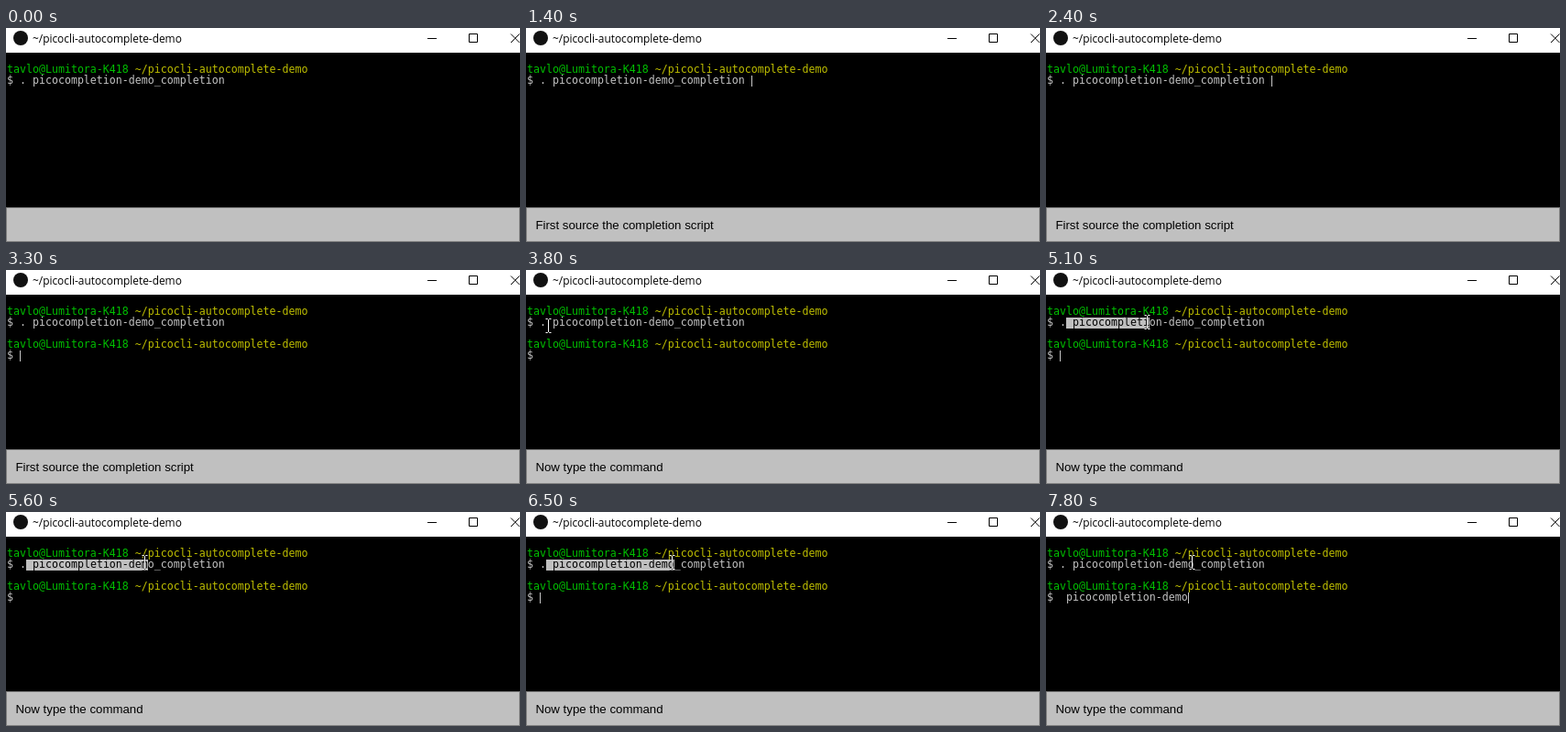
Recreate the animation shown at these times as an HTML page. Size 561 by 234 pixels, loop 8 s.

```html
<!DOCTYPE html>
<html lang="en">
<head>
<meta charset="utf-8">
<title>Autocomplete demo</title>
<style>
  html, body { margin: 0; width: 100%; height: 100%; overflow: hidden; background: #000; }
  svg { display: block; width: 561px; height: 234px; }
  text { white-space: pre; }
  .term { font: 11.627px "DejaVu Sans Mono", monospace; fill: #c4c4c4; }
  .user { fill: #00bf00; }
  .path { fill: #bfbf00; }
  .title { font: 11.9px "Open Sans", sans-serif; }
  .note { font: 13.25px "Liberation Sans", Arial, sans-serif; }
  .line { fill: none; stroke: #000; }
</style>
</head>
<body>
<svg viewBox="0 0 561 234">
  <rect width="561" height="234"/>
  <rect width="561" height="27" fill="#fff"/>
  <circle cx="16" cy="11" r="8" fill="#111"/>
  <text class="title" x="29" y="16">~/picocli-autocomplete-demo</text>
  <path class="line" d="M460 11.5h10M505.5 6.5h9v9h-9zM551 6.5l9.5 9.5M560.5 6.5l-9.5 9.5"/>

  <g class="term">
    <text x="1" y="49"><tspan class="user">tavlo@Lumitora-K418</tspan> <tspan class="path">~/picocli-autocomplete-demo</tspan></text>
    <text x="1" y="61">$ . picocompletion-demo_completion</text>
    <g id="prompt">
      <text x="1" y="85"><tspan class="user">tavlo@Lumitora-K418</tspan> <tspan class="path">~/picocli-autocomplete-demo</tspan></text>
      <text id="input" x="1" y="97">$</text>
    </g>
    <rect id="mark" x="22" y="52" height="12" fill="#bfbfbf"/>
    <text id="marked" x="29" y="61" fill="#000" style="fill:#000"></text>
  </g>
  <rect id="caret" width="1" height="12" fill="#c8c8c8"/>
  <g id="mouse" fill="none">
    <path d="M-2.5 .5h2l1 1l1-1h2M.5 1.5v13M-2.5 15.5h2l1-1l1 1h2" stroke="#000" stroke-width="2.4" opacity=".5"/>
    <path d="M-2.5 .5h2l1 1l1-1h2M.5 1.5v13M-2.5 15.5h2l1-1l1 1h2" stroke="#fff"/>
  </g>

  <rect x=".5" y="196.5" width="560" height="37" fill="#c0c0c0" stroke="#808080"/>
  <text id="note" class="note" x="10.4" y="220"></text>
</svg>
<script>
const LOOP = 8000, CELL = 7, LEFT = 1;
const SHOW_NOTE = 100, ENTER = 3300, DRAG_NOTE = 3800, DRAG = 4200, PASTE = 7800;
const COMMAND = "picocompletion-demo";
const $ = id => document.getElementById(id);
const [prompt, input, mark, marked, caret, mouse, note] =
  ["prompt", "input", "mark", "marked", "caret", "mouse", "note"].map($);

// Caret visible intervals
const blinks = [[400, 800], [1400, 1900], [2400, 2900], [3300, 3800], [4300, 4500],
  [4800, 5300], [5800, 6300], [6500, 7000], [7500, 8000]];

// Pointer path: time, x, y
const path = [[3800, 24, 53], [4100, 24, 53], [4200, 34, 52], [4500, 76, 50], [4600, 78, 50],
  [4700, 78, 50], [5600, 151, 47], [5700, 151, 47], [6100, 158, 47], [6200, 158, 47], [6300, 159, 47]];

function pointerAt(t) {
  const step = Math.floor(t / 100) * 100;
  const i = path.findIndex(p => p[0] > step);
  if (i < 0) return path[path.length - 1].slice(1);
  if (i === 0) return path[0].slice(1);
  const a = path[i - 1], b = path[i], k = (step - a[0]) / (b[0] - a[0]);
  return [1, 2].map(n => Math.round(a[n] + (b[n] - a[n]) * k));
}

const show = (el, on) => el.setAttribute("visibility", on ? "visible" : "hidden");

function render(t) {
  const entered = t >= ENTER, pasted = t >= PASTE;
  note.textContent = t < SHOW_NOTE ? "" :
    t < DRAG_NOTE ? "First source the completion script" : "Now type the command";

  show(prompt, entered);
  input.textContent = pasted ? "$  " + COMMAND : "$";

  const col = pasted ? 22 : entered ? 2 : 35;
  caret.setAttribute("x", LEFT + col * CELL);
  caret.setAttribute("y", entered ? 88 : 52);
  show(caret, blinks.some(([on, off]) => t >= on && t < off));

  const [x, y] = pointerAt(t);
  mouse.setAttribute("transform", `translate(${x} ${y})`);
  show(mouse, t >= DRAG_NOTE);

  const cells = t >= DRAG && !pasted ? Math.ceil((x - LEFT) / CELL) - 3 : 0;
  mark.setAttribute("width", cells * CELL);
  marked.textContent = COMMAND.slice(0, Math.max(0, cells - 1));
}

const start = performance.now();
function tick() {
  render((performance.now() - start) % LOOP);
  requestAnimationFrame(tick);
}
tick();
</script>
</body>
</html>
```
